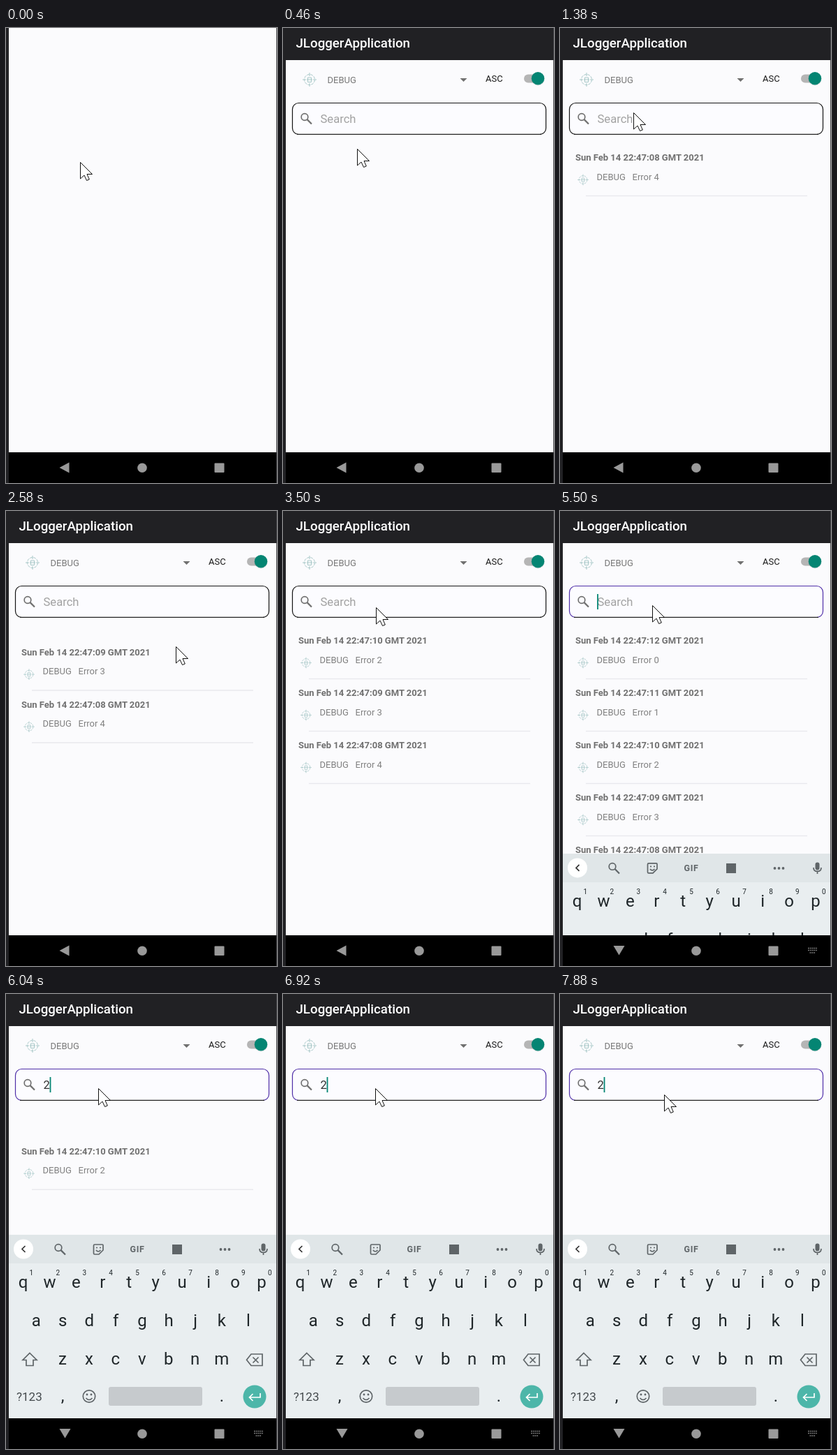
These frames come from a looping animation (388 px wide and 652 px high, 8000 ms). An HTML page:

```html
<!DOCTYPE html>
<html lang="en">
<head>
<meta charset="utf-8">
<title>Log viewer</title>
<style>
  html, body { margin: 0; width: 100%; height: 100%; overflow: hidden; background: #fbfbfd; }
  svg { display: block; font: 13px Roboto, sans-serif; }
  .line { fill: none; stroke-width: 1.7; }
  .mid { text-anchor: middle; }
  .bold { font-weight: 700; }
</style>
</head>
<body>
<svg width="388" height="652" viewBox="0 0 388 652">
  <defs>
    <g id="lens" class="line"><circle r="4.8"/><path d="M3.6 3.6L10 10" stroke-width="2.2"/></g>
    <g id="target" fill="none" stroke="#a8c8c8">
      <circle r="7.5" stroke-dasharray="4 1.2"/>
      <path d="M0-10V-5M0 5V10M-10 0H-5M5 0H10M-2.5-3H2.5V3.5H-2.5ZM-4 0H4"/>
    </g>
  </defs>
  <rect width="388" height="652" fill="#fbfbfd"/>

  <g id="app">
    <rect width="388" height="46" fill="#212124"/>
    <text x="18.5" y="27.5" font-size="18.7" font-weight="500" fill="#fff">JLoggerApplication</text>
    <use href="#target" x="38" y="74"/>
    <text x="63.5" y="79" fill="#787878">DEBUG</text>
    <path d="M253.5 72H263.5L258.5 77Z" fill="#707070"/>
    <text x="290" y="77.3" fill="#1c1c1c">ASC</text>
    <rect x="345" y="66.5" width="26" height="12" rx="6" fill="#b5b5b5"/>
    <circle cx="365" cy="73" r="9.6" fill="#00000018"/>
    <circle cx="365" cy="72.3" r="9.2" fill="#048573"/>
    <g id="list"></g>
    <g id="box" stroke-width="1.2">
      <rect x="13.5" y="107.5" width="363" height="45" rx="9" fill="#fcfcff"/>
      <path d="M20 152.3H370" stroke="#222"/>
    </g>
    <use href="#lens" x="31" y="127.5" stroke="#707070"/>
    <text id="query" x="53.5" y="136" font-size="16.6"></text>
    <path id="caret" d="M0 119V141" stroke="#048573" stroke-width="1.8"/>
  </g>

  <g id="keyboard">
    <rect y="345" width="388" height="263" fill="#e9eef0"/>
    <rect y="345" width="388" height="41" fill="#e0e6e8"/>
    <circle cx="25" cy="365.5" r="14" fill="#fff"/>
    <g class="line" stroke="#5f6568">
      <path d="M27.5 361L23 365.5L27.5 370" stroke="#333"/>
      <use href="#lens" x="75" y="363.5"/>
      <path d="M127 359H138Q139 359 139 360V367L133 373H127Q125.5 373 125.5 371.5V360.5Q125.5 359 127 359ZM129 367Q132 371 135.5 367"/>
      <path d="M129 363.5H131M134 363.5H136"/>
      <path d="M363 365Q363 370.5 368.5 370.5T374 365M368.5 370.5V374"/>
      <path d="M34 514.5L44 524.5H39V532.5H29V524.5H24Z"/>
      <path d="M351 516H367V532.5H351L344.5 524.3ZM353.5 520.5L361.5 528.5M361.5 520.5L353.5 528.5"/>
      <circle cx="119" cy="576.5" r="8.7"/>
      <path d="M114.5 579Q119 584 123.5 579"/>
    </g>
    <g fill="#5f6568">
      <rect x="365.5" y="357.5" width="6" height="11" rx="3"/>
      <rect x="238" y="359" width="14" height="14"/>
      <circle cx="307.5" cy="366" r="1.9"/><circle cx="313.5" cy="366" r="1.9"/><circle cx="319.5" cy="366" r="1.9"/>
      <circle cx="116" cy="574" r="1.4"/><circle cx="122" cy="574" r="1.4"/>
      <text x="188" y="370" class="mid bold" font-size="12.5" letter-spacing=".6">GIF</text>
    </g>
    <g id="keys" fill="#1f2629"></g>
    <text x="15" y="583" font-size="17" fill="#444a4d">?123</text>
    <rect x="147" y="563" width="134" height="27" rx="3" fill="#c6cacd"/>
    <circle cx="356" cy="577" r="16.5" fill="#4db6a9"/>
    <path d="M364 572V578H349M353.5 573L348.5 578L353.5 583" class="line" stroke="#fff"/>
  </g>

  <rect y="608" width="388" height="44"/>
  <g fill="#999">
    <path id="back"/>
    <circle cx="195" cy="630.3" r="6.8"/>
    <rect x="298.5" y="623.5" width="14" height="13.5" rx="1"/>
    <path id="switcher" d="M355 626.5H368M355 629.5H368M357.5 633H365.5" stroke="#777" stroke-width="1.6" stroke-dasharray="2 .8"/>
  </g>
  <rect width="4" height="652" fill="#212124"/>
  <rect x="387" width="1" height="652" fill="#48484c"/>
  <path id="cursor" d="M.5.5V24L6 19L9.5 26.5L13.3 25L10 17.5H17.5Z" fill="#fff" stroke="#111"/>
</svg>

<script>
const LOOP = 8000, ROW = 75, MOVE = 250, FADE = 120;
const APP = 420, FOCUS = 5400, SLIDE = 5450, TYPED = 5757, CLEARED = 6500;
const $ = id => document.getElementById(id);
const clamp = v => Math.max(0, Math.min(1, v));
const ease = v => (1 - Math.cos(Math.PI * clamp(v))) / 2;
const show = (el, on) => el.setAttribute('visibility', on ? 'visible' : 'hidden');
const shift = (el, x, y) => el.setAttribute('transform', `translate(${x} ${y})`);

// [time, x, y] of the pointer tip
const path = [[0, 106, 192], [210, 106, 192], [900, 105, 128], [1380, 105, 121], [1900, 112, 116],
  [2450, 242, 193], [2650, 244, 195], [3350, 133, 138], [3600, 133, 138], [4200, 132, 134], [5300, 132, 134],
  [5600, 132, 135], [7000, 132, 135], [7300, 198, 246], [7750, 149, 144], [LOOP, 149, 144]];

const born = k => 503 + 1000 * k;
$('list').innerHTML = [0, 1, 2, 3, 4].map(k => `<g>
  <text x="22" y="190" class="bold" fill="#707070">Sun Feb 14 22:47:${String(8 + k).padStart(2, 0)} GMT 2021</text>
  <use href="#target" transform="translate(33 217.5) scale(.78)"/>
  <text x="52.5" y="217.5" fill="#808080">DEBUG</text>
  <text x="103.5" y="217.5" fill="#808080">Error ${4 - k}</text>
  <path d="M37 240.5H354" stroke="#e9e9ee" stroke-width="1.5"/></g>`).join('');
const rows = [...$('list').children];

const key = (c, x, y, size = 24) => `<text x="${x}" y="${y}" class="mid" font-size="${size}">${c}</text>`;
const keyRow = (chars, x, y, size) => [...chars].map((c, i) => key(c, x + 37.95 * i, y, size)).join('');
$('keys').innerHTML = keyRow('qwertyuiop', 24.5, 421) + keyRow('asdfghjkl', 43.3, 476) +
  keyRow('zxcvbnm', 81, 531) + keyRow('1234567890', 36.3, 403, 10) + key(',', 81, 584) + key('.', 309, 584);

function placeRow(row, k, t) {
  let y = 0;
  for (let j = k + 1; j < rows.length; j++) y += ROW * ease((t - born(j)) / MOVE);
  const kept = k === 2;
  if (kept) y *= 1 - ease((t - TYPED - FADE) / MOVE);
  const fadeIn = clamp((t - born(k) - (k ? MOVE : 0)) / FADE);
  const fadeOut = clamp((t - (kept ? CLEARED : TYPED)) / FADE);
  shift(row, 0, y);
  row.setAttribute('opacity', fadeIn * (1 - fadeOut));
}

function placeCursor(t) {
  const i = path.findIndex(p => p[0] > t);
  const [t0, x0, y0] = path[i - 1], [t1, x1, y1] = path[i];
  const u = ease((t - t0) / (t1 - t0));
  shift($('cursor'), Math.round(x0 + (x1 - x0) * u), Math.round(y0 + (y1 - y0) * u));
}

function draw(now) {
  const t = now % LOOP, focused = t >= FOCUS, typed = t >= TYPED, open = t >= SLIDE;
  $('app').style.display = t >= APP ? '' : 'none';
  rows.forEach((row, k) => placeRow(row, k, t));
  $('box').setAttribute('stroke', focused ? '#4f2fa8' : '#151515');
  $('query').textContent = typed ? '2' : 'Search';
  $('query').setAttribute('fill', typed ? '#333' : '#a2a2a2');
  show($('caret'), focused && (t - (typed ? TYPED : FOCUS)) % 1000 < 500);
  shift($('caret'), typed ? 63.5 : 54, 0);
  show($('keyboard'), open);
  shift($('keyboard'), 0, 263 * (1 - clamp((t - SLIDE) / 200)) ** 2);
  $('back').setAttribute('d', open ? 'M76.5 623H92.5L84.5 636.5Z' : 'M76.5 630L90.5 622.5V637.5Z');
  show($('switcher'), open);
  placeCursor(t);
}

const start = performance.now();
(function tick() {
  draw(performance.now() - start);
  requestAnimationFrame(tick);
})();
</script>
</body>
</html>
```
